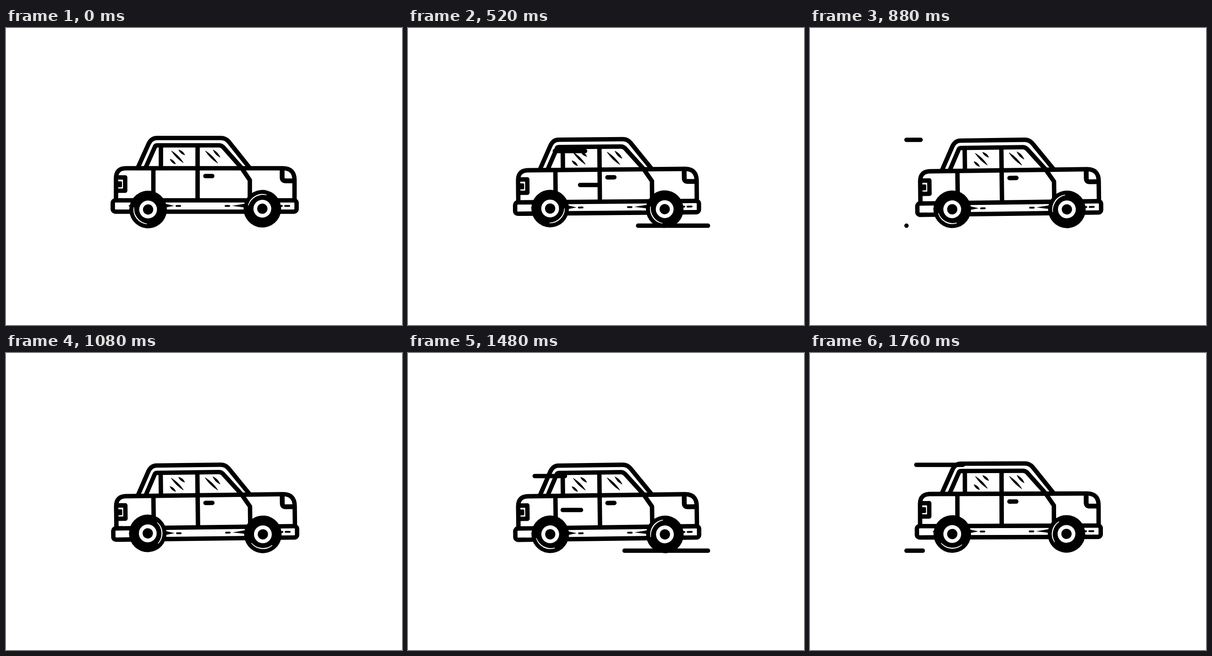
Write an HTML page that moves like this. It is 864 px wide and 648 px high and loops after 1800 ms.

```html
<!DOCTYPE html>
<html lang="en">
<head>
<meta charset="utf-8">
<title>Driving car</title>
<style>
  html, body { margin: 0; width: 100%; height: 100%; overflow: hidden; background: #fff; }
  svg { display: block; width: 100vw; height: 100vh; }
  .line { fill: none; stroke: #000; stroke-width: 9.6; stroke-linejoin: round; }
  .round { stroke-linecap: round; }
  .dash { stroke-width: 4; }
</style>
</head>
<body>
<svg viewBox="0 0 864 648">
  <defs>
    <g id="wheel">
      <circle r="41"/>
      <circle r="15.3" fill="none" stroke="#fff" stroke-width="8.2"/>
    </g>
    <path id="shine" d="M22-22.5A31.5 31.5 0 0 1 22 22.5A34 34 0 0 0 22-22.5Z"
      fill="#fff" stroke="#fff" stroke-width="1.4" stroke-linejoin="round"/>
  </defs>

  <g id="body">
    <g class="line">
      <path d="M288 304L311 253Q317 240 329 240H469Q479 240 486 248L531.5 305"/>
      <path d="M305 304L325 259Q326 256 330 256H465Q470 256 474 260L513 304L532 332V375"/>
      <path d="M338 256V304M418 256V376M321.5 305V360"/>
      <path d="M240 376V328Q240 306 262 306H604Q629.5 306 629.5 332V376"/>
      <path d="M602.5 306V326Q602.5 333.5 610 333.5H629" stroke-width="10.5"/>
      <path d="M240 326H260V355H240"/>
      <path class="round" d="M435 323H450"/>
      <rect x="233" y="376" width="401" height="24.7" rx="6" fill="#fff"/>
    </g>
    <rect x="240" y="334.5" width="13" height="13" rx="2"/>
    <g id="glare"></g>
    <path d="M346 383L367 388L346 392ZM524 383L493 388L524 392ZM272 385L267 388L272 391Z"/>
    <path class="line round dash" d="M372 388.3H380M479 388.3H487M600 388.3H602M609 388.3H618"/>
  </g>

  <g id="rear"><use href="#wheel"/><use href="#shine"/></g>
  <g id="front"><use href="#wheel"/><use href="#shine"/></g>
  <g id="wind" class="line round"></g>
</svg>
<script>
const $ = id => document.getElementById(id);
const LOOP = 1800, CYCLE = 600, STEP = 40;
const RIGHT = 654.5, LEFT = 210.5;
const RUNS = [0, 940];

// Speed lines: height, start, travel time, delay of the tail
const LINES = [
  { y: 244, start: 545, dur: 289, lag: 66 },
  { y: 268.5, start: 368, dur: 202, lag: 30 },
  { y: 342.5, start: 373, dur: 234, lag: 21 },
  { y: 431.3, start: 417, dur: 300, lag: 127 }
];

const leaf = (x1, y1, x2, y2) => {
  const mx = (x1 + x2) / 2, my = (y1 + y2) / 2, w = 3;
  return `M${x1} ${y1}Q${mx + w} ${my - w} ${x2} ${y2}Q${mx - w} ${my + w} ${x1} ${y1}Z`;
};
$('glare').innerHTML = `<path stroke="#000" stroke-width="1" stroke-linejoin="round" d="${[
  [361, 268, 387, 294], [377, 266, 390, 277], [358, 286, 370, 297],
  [435, 268, 462, 295], [452, 266, 467, 282]
].map(p => leaf(...p)).join('')}"/>`;

const clamp = v => Math.min(1, Math.max(0, v));
const ease = v => (1 - Math.cos(Math.PI * clamp(v))) / 2;

function windPath(t) {
  let d = '';
  for (const run of RUNS) for (const { y, start, dur, lag } of LINES) {
    const age = t - run - start;
    if (age <= 0 || age > dur + lag + 45) continue;
    const at = ms => RIGHT + (LEFT - RIGHT) * clamp(ms / dur);
    d += `M${at(age)} ${y}L${at(age - lag) + 0.01} ${y}`;
  }
  return d;
}

function place(id, x, y, turn) {
  $(id).setAttribute('transform', `translate(${x} ${y}) rotate(${turn})`);
}

function draw(now) {
  const t = Math.floor(now % LOOP / STEP) * STEP;
  const p = t % CYCLE;
  // The tail sinks, stays low, then springs back
  const sink = ease((p - 30) / 200) * (1 - ease((p - 460) / 150));
  const turn = p / CYCLE * 720;
  const a = (turn + 50) * Math.PI / 180;

  $('body').setAttribute('transform',
    `translate(0 ${4.4 * sink}) rotate(${-0.75 * sink} 432 300)`);
  place('rear', 309.4 + Math.cos(a), 394.9 + 1.4 * Math.sin(a), turn + 142);
  place('front', 559.3 + 1.2 * sink, 394.3 + 1.4 * sink, turn + 240);
  $('wind').innerHTML = `<path d="${windPath(t)}"/>`;
}

const begin = performance.now();
(function tick() {
  draw(performance.now() - begin);
  requestAnimationFrame(tick);
})();
</script>
</body>
</html>
```
